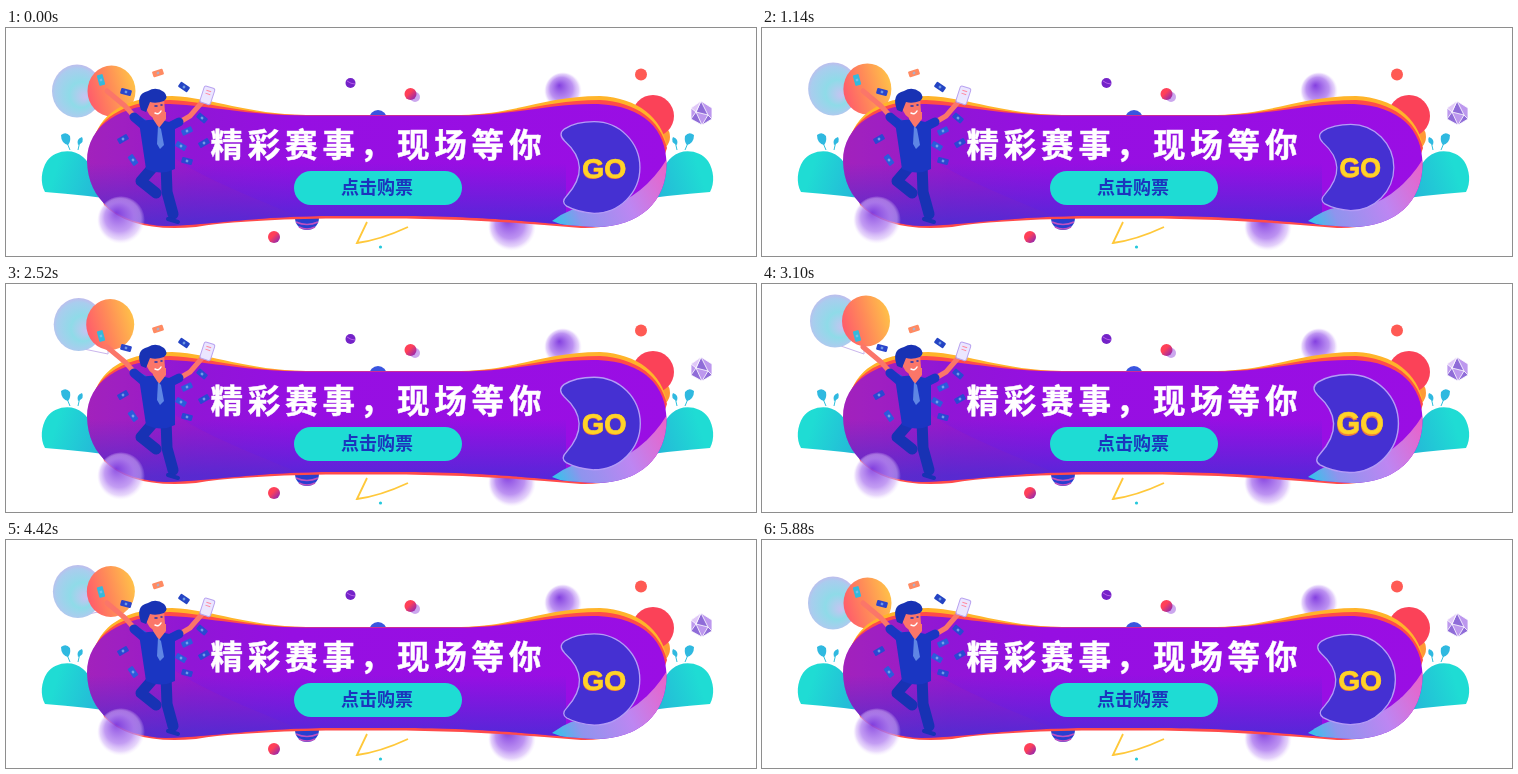
These frames come from a looping animation (750x228 px, 5.9 s). An HTML page:

```html
<!DOCTYPE html>
<html lang="zh">
<head>
<meta charset="utf-8">
<style>
html, body { margin: 0; width: 100%; height: 100%; overflow: hidden; background: #fff; }
svg { display: block; width: 750px; height: 228px; }
text { font-family: "Noto Sans CJK SC", "Noto Sans CJK", sans-serif; }
.go { font: 900 28px "Liberation Sans", sans-serif; text-anchor: middle; }
</style>
</head>
<body>
<svg viewBox="0 0 750 228">
  <defs>
    <radialGradient id="mint" cx=".45" cy=".5" r=".6" fx=".68" fy=".62">
      <stop offset="0" stop-color="#c9c2f2"/><stop offset=".4" stop-color="#8fdbe8"/><stop offset=".75" stop-color="#a9cdee"/><stop offset="1" stop-color="#d9a9ec"/>
    </radialGradient>
    <linearGradient id="coral" x1="0" y1=".65" x2="1" y2=".35">
      <stop offset="0" stop-color="#ff5a6c"/><stop offset=".5" stop-color="#ff8c58"/><stop offset="1" stop-color="#ffc248"/>
    </linearGradient>
    <radialGradient id="haze" cx=".5" cy=".5" r=".5" fx=".4" fy=".35">
      <stop offset="0" stop-color="#8440e0"/><stop offset=".6" stop-color="#b586f0" stop-opacity=".9"/><stop offset=".85" stop-color="#d3b4f8" stop-opacity=".6"/><stop offset="1" stop-color="#f0e0ff" stop-opacity="0"/>
    </radialGradient>
    <linearGradient id="teal" x1="36" x2="100" y1="140" y2="160" gradientUnits="userSpaceOnUse">
      <stop offset=".2" stop-color="#1fdcd4"/><stop offset="1" stop-color="#25b4d8"/>
    </linearGradient>
    <linearGradient id="body" x1="82" x2="662" y1="0" y2="0" gradientUnits="userSpaceOnUse">
      <stop offset="0" stop-color="#9c22c4"/><stop offset=".18" stop-color="#9016d6"/><stop offset=".35" stop-color="#960fe2"/><stop offset="1" stop-color="#9a0ee4"/>
    </linearGradient>
    <linearGradient id="low" x1="0" x2="0" y1="135" y2="192" gradientUnits="userSpaceOnUse">
      <stop offset="0" stop-color="#2f35d2" stop-opacity="0"/><stop offset="1" stop-color="#2f35d2" stop-opacity=".6"/>
    </linearGradient>
    <linearGradient id="swoosh" x1="548" x2="662" y1="192" y2="140" gradientUnits="userSpaceOnUse">
      <stop offset="0" stop-color="#35c3ea"/><stop offset=".2" stop-color="#8f94ee"/><stop offset=".6" stop-color="#bd86f2"/><stop offset="1" stop-color="#ea62c8"/>
    </linearGradient>
    <linearGradient id="berry" x1="0" x2="1" y1="0" y2="1">
      <stop offset=".4" stop-color="#ff4058"/><stop offset="1" stop-color="#7a22c4"/>
    </linearGradient>
    <clipPath id="inside"><use href="#shape"/></clipPath>
  </defs>

  <!-- side clouds and sprouts -->
  <g id="cloud">
    <path fill="url(#teal)" d="M39 164C34 155 35 142 41 133C49 122 67 120 77 129C84 135 86 142 89 148L118 156V173Q80 167 39 164Z"/>
    <path d="M59 110L64 122M74 113L72 122" stroke="#2fc0dc" fill="none"/>
    <path d="M55 107Q60 103 64 108Q65 114 62 117Q55 115 55 107ZM72 117Q70 111 76 109Q79 114 72 117Z" fill="#2fb9e0"/>
  </g>
  <use href="#cloud" transform="matrix(-1 0 0 1 743 0)"/>

  <!-- decorations behind the banner -->
  <circle cx="557" cy="63" r="19" fill="url(#haze)"/>
  <circle cx="506" cy="199" r="24" fill="url(#haze)"/>
  <circle cx="650" cy="109" r="14" fill="#ff9a35"/>
  <circle cx="647" cy="88" r="21" fill="#fb4258"/>
  <circle cx="372" cy="91" r="9" fill="#3a55e0"/>
  <circle cx="301" cy="190" r="12" fill="#283fd0"/>
  <path d="M290 194Q301 199 312 194M293 199Q301 203 309 199" fill="none" stroke="#c050c0" stroke-width="1.6"/>
  <circle cx="344.500" cy="55" r="5" fill="#7423c8"/>
  <path d="M341 53Q345 56 349 56" stroke="#b45ce8" fill="none"/>
  <circle cx="409" cy="69" r="5" fill="#b98ae8" opacity=".75"/>
  <circle cx="404.500" cy="66" r="6" fill="url(#berry)"/>
  <circle cx="635" cy="46.500" r="6" fill="#ff5a54"/>
  <circle cx="268" cy="209" r="6" fill="url(#berry)"/>
  <g stroke="#fff" stroke-width=".8">
    <path d="M695 73L706 80V91L696 97L685 91V80Z" fill="#bd98ee"/>
    <path d="M695 73L690 84L702 87ZM690 84L685 91L696 97ZM702 87L696 97L706 91Z" fill="#8f6cd8"/>
    <path d="M685 80L690 84L695 73Z" fill="#e0c8f8"/>
  </g>
  <path d="M361 194L351 215Q374 212 402 199" fill="none" stroke="#ffc83a" stroke-width="1.800"/>
  <circle cx="374.500" cy="219" r="1.600" fill="#25c8dc"/>

  <!-- balloons -->
  <g id="balloons" fill="none" stroke="#c9b5ec">
    <path id="stringA"/><path id="stringB"/>
    <ellipse id="ballA" rx="25" ry="26.500" fill="url(#mint)" stroke="none"/>
    <ellipse id="ballB" rx="24" ry="25.500" fill="url(#coral)" stroke="none"/>
  </g>

  <!-- banner layers -->
  <path fill="#ffb42a" d="M88 112C95 82 126 68 166 68C208 70 240 86 300 87H455C510 86 540 68 594 68C632 70 656 90 661 118Z"/>
  <path fill="#ff4b4a" d="M86 114C94 87 125 72 164 72C208 74 240 87 300 87H455C510 87 540 72 594 72C630 74 654 92 661 120L640 182Q610 201 575 200Q490 192 400 190.500H320Q230 192 190 199Q126 205 98 177Z"/>
  <path id="shape" fill="url(#body)" d="M81 133C81 96 118 75 164 76C208 78 238 87 300 87.500H455C512 87 544 75 592 76C638 78 660.500 102 660.500 136C660.500 173 634 199 590 199C540 196 500 189 400 188H330C250 188 205 197 160 198C112 196 82 173 81 133Z"/>
  <g clip-path="url(#inside)">
    <path d="M81 75H134Q156 86 166 128Q190 148 292 188V200H81Z" fill="#c3238f" opacity=".14"/>
    <path d="M81 135H560V200H81Z" fill="url(#low)"/>
    <path d="M664 126C668 170 636 202 590 202Q565 201 546 193Q572 173 600 180Q640 168 664 126Z" fill="url(#swoosh)"/>
  </g>
  <circle cx="115" cy="192" r="24" fill="url(#haze)" opacity=".9"/>

  <!-- flying notes -->
  <g id="notes"></g>

  <!-- jumping man -->
  <g stroke-linecap="round" stroke-linejoin="round" fill="none">
    <path d="M129 89L119 78L101 63" stroke="#fb7669" stroke-width="5"/>
    <path d="M141 100L128 89" stroke="#1a36c2" stroke-width="9"/>
    <path d="M172 95L184 88L197 73" stroke="#fb7669" stroke-width="5"/>
    <path d="M163 99L173 94" stroke="#1a36c2" stroke-width="9"/>
    <path d="M148 138L135 153L150 165" stroke="#1832b4" stroke-width="11"/>
    <path d="M160 136L161 164L167 186" stroke="#1832b4" stroke-width="11"/>
    <path d="M162 191L172 194" stroke="#1832b4" stroke-width="4"/>
    <path d="M133 94Q149 88 169 96L169 141Q155 148 140 141Z" fill="#1a36c2"/>
    <path d="M147 91L153 100L160 91V84H147Z" fill="#fb7669"/>
    <path d="M152 98L155 101L158 117L154 121L151 116Z" fill="#5f86e4"/>
    <path d="M139 70Q149 65 158 70L159 84Q155 92 147 90Q139 85 139 70Z" fill="#fb7669"/>
    <path d="M135 82Q129 66 142 63Q150 58 158 64Q163 69 158 73Q150 76 144 74L140 84Z" fill="#1832b4"/>
    <path d="M149 85Q153 87 155 83" stroke="#fff" stroke-width="1.500"/>
    <path d="M149 78H151M155 77H156" stroke="#1832b4" stroke-width="1.500"/>
  </g>
  <g transform="rotate(18 202 67)">
    <rect x="196" y="59" width="11" height="17" rx="2" fill="#ebe6ff" stroke="#b8a2f0"/>
    <path d="M199 63H204M199 66H204" stroke="#ff8aa0"/>
  </g>

  <!-- headline and button -->
  <text x="204.500" y="129" font-size="32.500" font-weight="900" letter-spacing="4.800" fill="#fff" stroke="#fff" stroke-width=".5">精彩赛事，现场等你</text>
  <rect x="288" y="143" width="168" height="34" rx="17" fill="#1edcd4"/>
  <text x="371" y="166" font-size="18" font-weight="700" text-anchor="middle" fill="#1b35bd">点击购票</text>

  <!-- pulsing disc, drawn around the centre of its label -->
  <g id="go">
    <path d="M-39 -38Q-28 -45 -10 -45A45 45 0 0 1 -10 45Q-26 44 -37 38Q-43 34 -37 28Q-11 -1 -39 -26Q-46 -33 -39 -38Z" fill="#4530d2" stroke="#b49cf6" stroke-width="1.300"/>
    <text class="go" x="-.5" y="11" fill="#ee7d3c">GO</text>
    <text class="go" y="10" fill="#ffd328" stroke="#ffd328" stroke-width=".6">GO</text>
  </g>
</svg>
<script>
const LOOP = 5900, PULSES = 8;
const $ = id => document.getElementById(id);
const set = (el, attrs) => Object.entries(attrs).forEach(([k, v]) => el.setAttribute(k, v));

// [x, y, angle, fill]
const notes = [[95, 52, 75, "#35b9dc"], [120, 64, 15, "#2a45cc"], [152, 45, -18, "#ff8a62"],
  [178, 59, 35, "#2444c4"], [134, 92, 25, "#2c5bdc"], [117, 111, -30, "#2a48d2"],
  [181, 103, -25, "#2c5bdc"], [196, 90, 40, "#2a48d2"], [175, 118, 30, "#2c5bdc"],
  [198, 115, -30, "#2a48d2"], [127, 132, 55, "#2c5bdc"], [181, 133, 15, "#2a48d2"]];
$("notes").innerHTML = notes.map(([x, y, a, c]) =>
  `<g transform="translate(${x} ${y}) rotate(${a})"><rect x="-5.5" y="-3" width="11" height="6" rx="1" fill="${c}"/>` +
  `<circle r="1.4" fill="#8fbdf0" opacity=".7"/></g>`).join("");

// eased progress from 0 to 1 between two times
function ease(t, from, to) {
  const u = Math.min(1, Math.max(0, (t - from) / (to - from)));
  return (1 - Math.cos(Math.PI * u)) / 2;
}

function draw(t) {
  const h = ease(t, 700, 3100) - ease(t, 3400, 5300);
  const ax = 71 + 2 * h, ay = 63 - 26 * h;
  const bx = 105.5 - 1.5 * h, by = 63 - 26 * h;
  set($("ballA"), { cx: ax, cy: ay });
  set($("ballB"), { cx: bx, cy: by });
  set($("stringA"), { d: `M${ax + 3} ${ay + 24}L102 70` });
  set($("stringB"), { d: `M${bx - 2} ${by + 24}L102 70` });
  const scale = 1 + .09 * Math.sin(2 * Math.PI * (t * PULSES / LOOP + .03));
  set($("go"), { transform: `translate(598.3 139.5) scale(${scale})` });
}

const start = performance.now();
function tick() {
  draw((performance.now() - start) % LOOP);
  requestAnimationFrame(tick);
}
tick();
</script>
</body>
</html>
```
